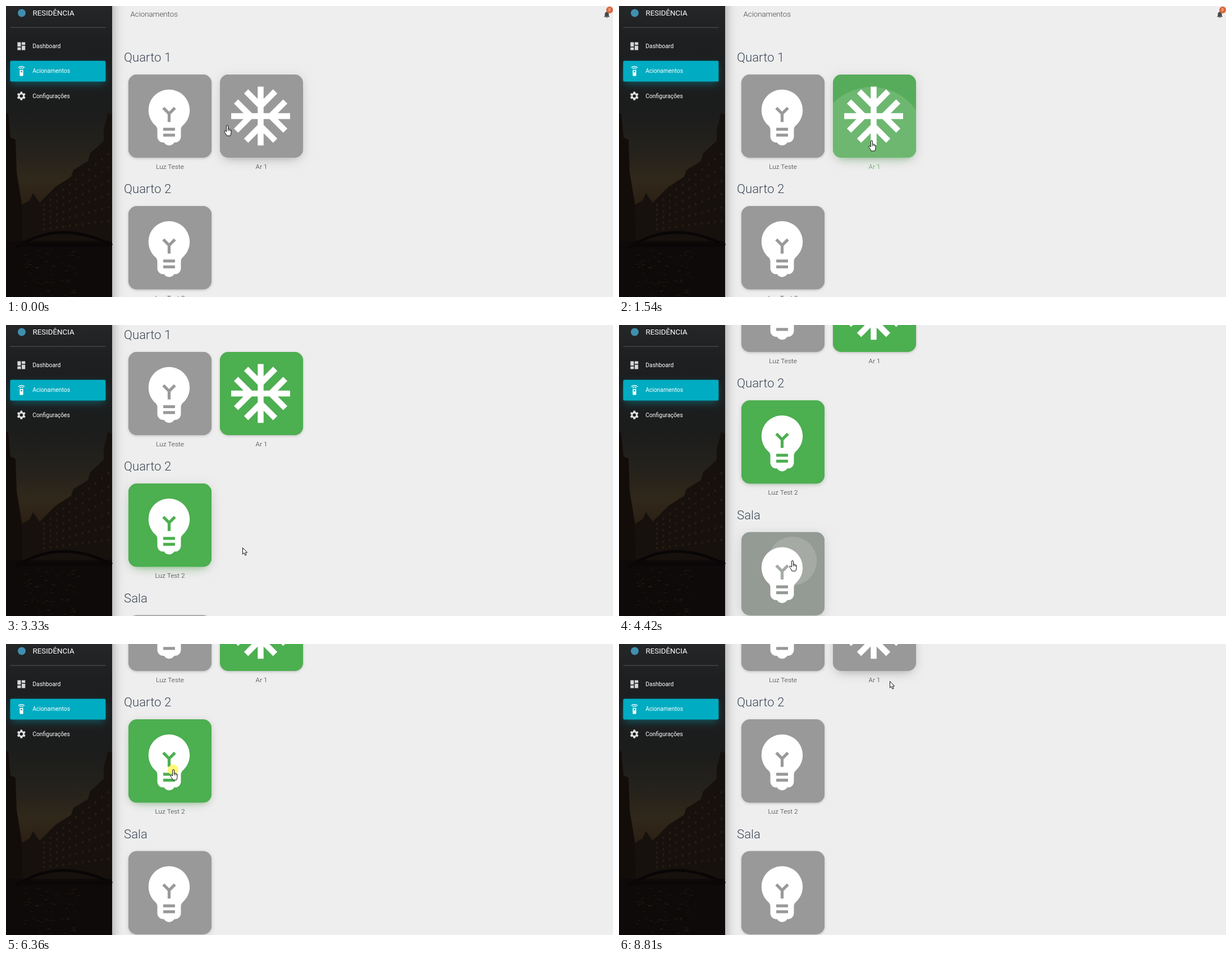
Write an HTML page with a canvas that moves like this. It is 1081x518 px and loops after 8970 ms.

```html
<!DOCTYPE html>
<html lang="pt">
<head>
<meta charset="utf-8">
<style>
html, body { margin: 0; width: 100%; height: 100%; overflow: hidden; background: #eee; }
canvas { display: block; }
</style>
</head>
<body>
<canvas id="stage" width="1081" height="518"></canvas>
<script>
const ctx = document.getElementById('stage').getContext('2d');
const LOOP = 8970, CARD = 148;
const OFF = [153, 153, 153], ON = [76, 175, 80];

const bulb = new Path2D('M12 3c-.46 0-.93.04-1.4.14-2.76.53-4.96 2.76-5.48 5.52-.48 2.61.48 5.01 2.22 6.56.43.38.66.91.66 1.47V19c0 1.1.9 2 2 2h.28c.35.6.98 1 1.72 1s1.38-.4 1.72-1H14c1.1 0 2-.9 2-2v-2.31c0-.55.22-1.09.64-1.46C18.09 13.95 19 12.08 19 10c0-3.87-3.13-7-7-7zm2 16h-4v-1h4v1zm0-2h-4v-1h4v1zm-1.5-5.59V14h-1v-2.59L9.67 9.59l.71-.71L12 10.5l1.62-1.62.71.71-1.83 1.82z');
const bell = new Path2D('M12 22c1.1 0 2-.9 2-2h-4c0 1.1.89 2 2 2zm6-6v-5c0-3.07-1.64-5.64-4.5-6.32V4c0-.83-.67-1.5-1.5-1.5s-1.5.67-1.5 1.5v.68C7.63 5.36 6 7.92 6 11v5l-2 2v1h16v-1l-2-2z');
const tiles = new Path2D('M3 13h8V3H3zm0 8h8v-6H3zm10 0h8V11h-8zm0-18v6h8V3z');
const hand = new Path2D('M-1.5 1Q-1.5-.5 0-.5T1.5 1V6Q3 5 4 6.5 5.5 6 6 7.5 7 7 7 9V12Q7 15 5.5 18H-1Q-2 15-4.5 12-6 10-4.5 9-3 9-1.5 11Z');
const arrow = new Path2D('M.5.5V12L3.2 9.6 5 14 7 13.2 5.2 9H8.6Z');

// lift: spans of hover or focus; presses: pointer down, start of colour change, new state
const cards = [
  { x: 218, y: 122, label: 'Luz Teste', lift: [], presses: [] },
  { x: 381, y: 122, label: 'Ar 1', cold: true, lift: [[-300, 2640], [6840, 9999]],
    presses: [[1305, 1360, 1], [6990, 7070, 0]] },
  { x: 218, y: 356.3, label: 'Luz Test 2', lift: [[2200, 4265], [6240, 6990]],
    presses: [[2640, 2730, 1], [6340, 6440, 0]] },
  { x: 218, y: 590.7, label: 'Luz Sala', lift: [[4080, 6200]],
    presses: [[4265, 4385, 1], [5760, 5850, 0]] }
];

// time, x, y of the pointer tip
const route = [
  [30, 394, 213], [360, 461, 268], [530, 461, 268], [740, 450, 240], [1720, 450, 240],
  [2160, 350, 400], [2330, 309, 425], [2930, 309, 425], [3180, 421, 396], [3870, 421, 396],
  [4180, 309, 420], [6040, 309, 420], [6290, 298, 224], [6470, 298, 224], [6630, 427, 107],
  [6900, 468, 32], [7520, 468, 32], [8010, 470, 94], [8410, 470, 94], [8500, 472, 100],
  [8740, 472, 100], [8810, 482, 66]
];

const ramp = (t, from, to) => Math.min(1, Math.max(0, (t - from) / (to - from)));
const mix = (a, b, p) => a + (b - a) * p;
const smooth = p => p * p * (3 - 2 * p);
const scrollAt = t => t < 3210 ? 0 : t < 3400 ? 74 : t < 3540 ? 148 : 222;

// cubic-bezier(.4, 0, .2, 1)
function standardEase(p) {
  let lo = 0, hi = 1, s;
  for (let i = 0; i < 16; i++) {
    s = (lo + hi) / 2;
    const x = 1.2 * (1 - s) ** 2 * s + 0.6 * (1 - s) * s * s + s ** 3;
    if (x < p) lo = s; else hi = s;
  }
  return s * s * (3 - 2 * s);
}

function pointerAt(t) {
  const i = route.findIndex(k => k[0] > t);
  if (i < 0) return route[route.length - 1].slice(1);
  if (i === 0) return route[0].slice(1);
  const [a, b] = [route[i - 1], route[i]];
  const p = smooth(ramp(t, a[0], b[0]));
  return [mix(a[1], b[1], p), mix(a[2], b[2], p)];
}

function text(str, x, y, size, weight, color, align = 'left') {
  ctx.font = `${weight} ${size}px Roboto, sans-serif`;
  ctx.textAlign = align;
  ctx.fillStyle = color;
  ctx.fillText(str, x, y);
}

function box(x, y, w, h, r, color) {
  ctx.beginPath();
  ctx.roundRect(x, y, w, h, r);
  ctx.fillStyle = color;
  ctx.fill();
}

function disc(x, y, r, color) {
  ctx.beginPath();
  ctx.arc(x, y, r, 0, 7);
  ctx.fillStyle = color;
  ctx.fill();
}

function poly(color, ...points) {
  ctx.beginPath();
  points.forEach(([x, y]) => ctx.lineTo(x, y));
  ctx.fillStyle = color;
  ctx.fill();
}

function shadowBox(x, y, w, h, r, dy, blur, spread, color, fill) {
  ctx.save();
  ctx.shadowColor = color;
  ctx.shadowBlur = blur;
  ctx.shadowOffsetY = dy;
  box(x - spread, y - spread, w + 2 * spread, h + 2 * spread, r, fill);
  ctx.restore();
}

// Runs draw in the 24-unit icon grid centred on x, y
function icon(x, y, scale, color, draw) {
  ctx.save();
  ctx.translate(x, y);
  ctx.scale(scale, scale);
  ctx.translate(-12, -12);
  ctx.fillStyle = ctx.strokeStyle = color;
  ctx.lineWidth = 2;
  draw();
  ctx.restore();
}

function snowflake() {
  ctx.translate(12, 12);
  for (let i = 0; i < 4; i++) {
    ctx.beginPath();
    ctx.moveTo(0, 0);
    ctx.lineTo(0, -10);
    ctx.moveTo(-4.95, -8.365);
    ctx.lineTo(0.7, -2.71);
    ctx.moveTo(4.95, -8.365);
    ctx.lineTo(-0.7, -2.71);
    ctx.stroke();
    ctx.rotate(Math.PI / 2);
  }
}

function remote() {
  for (const r of [6, 10]) {
    ctx.beginPath();
    ctx.arc(12, 11, r, -Math.PI * 0.75, -Math.PI * 0.25);
    ctx.stroke();
  }
  ctx.beginPath();
  ctx.roundRect(8, 9, 8, 14, 1);
  ctx.moveTo(14, 13);
  ctx.arc(12, 13, 2, 0, 7);
  ctx.fill('evenodd');
}

function gear() {
  ctx.translate(12, 12);
  ctx.lineWidth = 3.6;
  ctx.beginPath();
  ctx.arc(0, 0, 5.4, 0, 7);
  ctx.stroke();
  for (let i = 0; i < 6; i++) {
    ctx.beginPath();
    ctx.moveTo(-2.9, -6);
    ctx.lineTo(-2.1, -9.8);
    ctx.lineTo(2.1, -9.8);
    ctx.lineTo(2.9, -6);
    ctx.fill();
    ctx.rotate(Math.PI / 3);
  }
}

function drawCard(card, t) {
  const { x, y } = card;
  let shade = 0;
  for (const [, change, on] of card.presses)
    if (t >= change) shade = mix(1 - on, on, ramp(t, change, change + 200) ** 1.6);
  const rgb = OFF.map((c, i) => Math.round(mix(c, ON[i], shade))).join();
  const fill = `rgb(${rgb})`;
  const lift = Math.max(0, ...card.lift.map(([a, b]) => ramp(t, a, a + 200) * (1 - ramp(t, b, b + 200))));

  shadowBox(x, y, CARD, CARD, 15, mix(1.5, 3, lift), mix(4, 17, lift), 0, `rgba(0,0,0,${mix(0.2, 0.12, lift)})`, fill);
  if (lift > 0) {
    shadowBox(x, y, CARD, CARD, 15, 10.4, 19, -9, `rgba(${rgb},${0.42 * lift})`, fill);
    shadowBox(x, y, CARD, CARD, 15, 6, 7.4, -3.7, `rgba(${rgb},${0.2 * lift})`, fill);
  }
  box(x, y, CARD, CARD, 15, fill);
  icon(x + 72.5, y + 73.9, 5.24, '#fff', card.cold ? snowflake : () => ctx.fill(bulb));

  for (const [down] of card.presses) {
    const fade = 1 - smooth(ramp(t, down + 120, down + 370));
    if (t < down || fade === 0) continue;
    const [px, py] = pointerAt(down);
    const cx = px - x, cy = py + scrollAt(down) - y;
    const reach = Math.hypot(Math.max(cx, CARD - cx) + 1, Math.max(cy, CARD - cy) + 1);
    const grow = standardEase(ramp(t, down, down + 550));
    ctx.save();
    ctx.beginPath();
    ctx.roundRect(x, y, CARD, CARD, 15);
    ctx.clip();
    disc(x + cx, y + cy, reach * grow, `rgba(255,255,255,${(0.1 + 0.2 * grow) * fade})`);
    ctx.restore();
  }
  const tinted = card.cold && t > 1400 && t < 2050;
  text(card.label, x + 74, y + 167.6, 11.84, 300, tinted ? '#3f9c43' : '#333', 'center');
}

function drawContent(t) {
  ctx.save();
  ctx.translate(0, -scrollAt(t));
  text('Acionamentos', 221.5, 18.5, 13.32, 300, '#444');
  icon(1070, 15.2, 0.6, '#4a4a4a', () => ctx.fill(bell));
  disc(1075, 7, 6, '#d9673a');
  text('0', 1075, 9.4, 6.7, 400, '#fff', 'center');
  ['Quarto 1', 'Quarto 2', 'Sala'].forEach((name, i) =>
    text(name, 210, 99 + 234.3 * i, 22.2, 300, '#3c4858'));
  cards.forEach(card => drawCard(card, t));
  ctx.restore();
}

// Dim view of a canal at dusk between brick warehouses
function drawScene() {
  const sky = ctx.createLinearGradient(0, 0, 0, 518);
  [[0, '#242628'], [0.12, '#1d1f21'], [0.36, '#1b1c1c'], [0.5, '#25221c'], [0.6, '#30281a'],
   [0.68, '#2c2015'], [0.78, '#15100c'], [1, '#0b0908']].forEach(([p, c]) => sky.addColorStop(p, c));
  ctx.fillStyle = sky;
  ctx.fillRect(0, 0, 189, 518);
  poly('#17110d', [189, 194], [182, 190], [174, 220], [174, 240], [150, 262], [146, 276], [120, 292],
    [116, 304], [88, 322], [60, 350], [54, 342], [48, 333], [42, 346], [28, 354], [28, 420], [189, 420]);
  poly('#130d0a', [0, 190], [4, 192], [8, 234], [17, 238], [19, 296], [28, 350], [30, 440], [0, 440]);
  ctx.fillStyle = 'rgba(92,58,32,.28)';
  for (let col = 0; col < 11; col++)
    for (let row = 0; row < 6; row++) {
      const x = 66 + col * 11.5, top = 352 - col * 9;
      ctx.fillRect(x, top + row * (404 - top) / 6, 3, 4);
    }
  ctx.fillStyle = '#0d0a09';
  ctx.fillRect(0, 418, 189, 100);
  ctx.strokeStyle = '#080606';
  ctx.lineWidth = 5;
  ctx.beginPath();
  ctx.moveTo(18, 430);
  ctx.quadraticCurveTo(95, 378, 189, 426);
  ctx.stroke();
  ctx.fillStyle = '#090707';
  ctx.fillRect(22, 422, 167, 7);
  let seed = 7;
  const random = () => (seed = seed * 16807 % 2147483647) / 2147483647;
  for (let i = 0; i < 80; i++) {
    ctx.fillStyle = `rgba(110,78,48,${0.1 + 0.22 * random()})`;
    ctx.fillRect(28 + 100 * random(), 434 + 84 * random(), 2 + 5 * random(), 1);
  }
}

function drawSidebar() {
  shadowBox(0, -20, 189, 558, 0, 3, 19, 0, 'rgba(0,0,0,.38)', '#1d1f21');
  drawScene();
  disc(28, 12.5, 7, '#3f8fb0');
  text('RESIDÊNCIA', 47.5, 17, 13.32, 400, '#fff');
  ctx.fillStyle = 'rgba(180,180,180,.35)';
  ctx.fillRect(7.4, 37.7, 170, 1);
  shadowBox(7.4, 97.5, 170, 37, 2.5, 6, 14, -2, 'rgba(0,172,193,.4)', '#00acc1');
  box(7.4, 97.5, 170, 37, 2.5, '#00acc1');
  const pale = 'rgba(255,255,255,.82)';
  icon(27.3, 71.5, 0.77, pale, () => ctx.fill(tiles));
  icon(27.5, 116, 0.78, '#fff', remote);
  icon(27.3, 160.2, 0.78, pale, gear);
  ['Dashboard', 'Acionamentos', 'Configurações'].forEach((name, i) =>
    text(name, 47.2, 74.8 + 44.4 * i, 10.36, 400, '#fff'));
}

function drawPointer(t) {
  const [x, y] = pointerAt(t);
  const pressed = cards.some(c => c.presses.some(([down]) => t >= down && t < down + 120));
  if (pressed) disc(x - 0.5, y, 9.5, 'rgba(255,246,80,.8)');
  const py = y + scrollAt(t);
  const over = cards.some(c => x > c.x && x < c.x + CARD && py > c.y && py < c.y + CARD);
  const shape = over ? hand : arrow;
  ctx.save();
  ctx.translate(Math.round(x), Math.round(y));
  ctx.fillStyle = '#fff';
  ctx.strokeStyle = '#111';
  ctx.lineWidth = 1;
  ctx.lineJoin = 'round';
  ctx.fill(shape);
  ctx.stroke(shape);
  if (over) {
    ctx.beginPath();
    for (const [fx, fy] of [[1.5, 6], [4, 6.5], [6, 8]]) {
      ctx.moveTo(fx, fy);
      ctx.lineTo(fx, 9.5);
    }
    ctx.stroke();
  }
  ctx.restore();
}

function frame() {
  const t = performance.now() % LOOP;
  ctx.fillStyle = '#eee';
  ctx.fillRect(0, 0, 1081, 518);
  drawContent(t);
  drawSidebar();
  drawPointer(t);
  requestAnimationFrame(frame);
}
frame();
</script>
</body>
</html>
```
